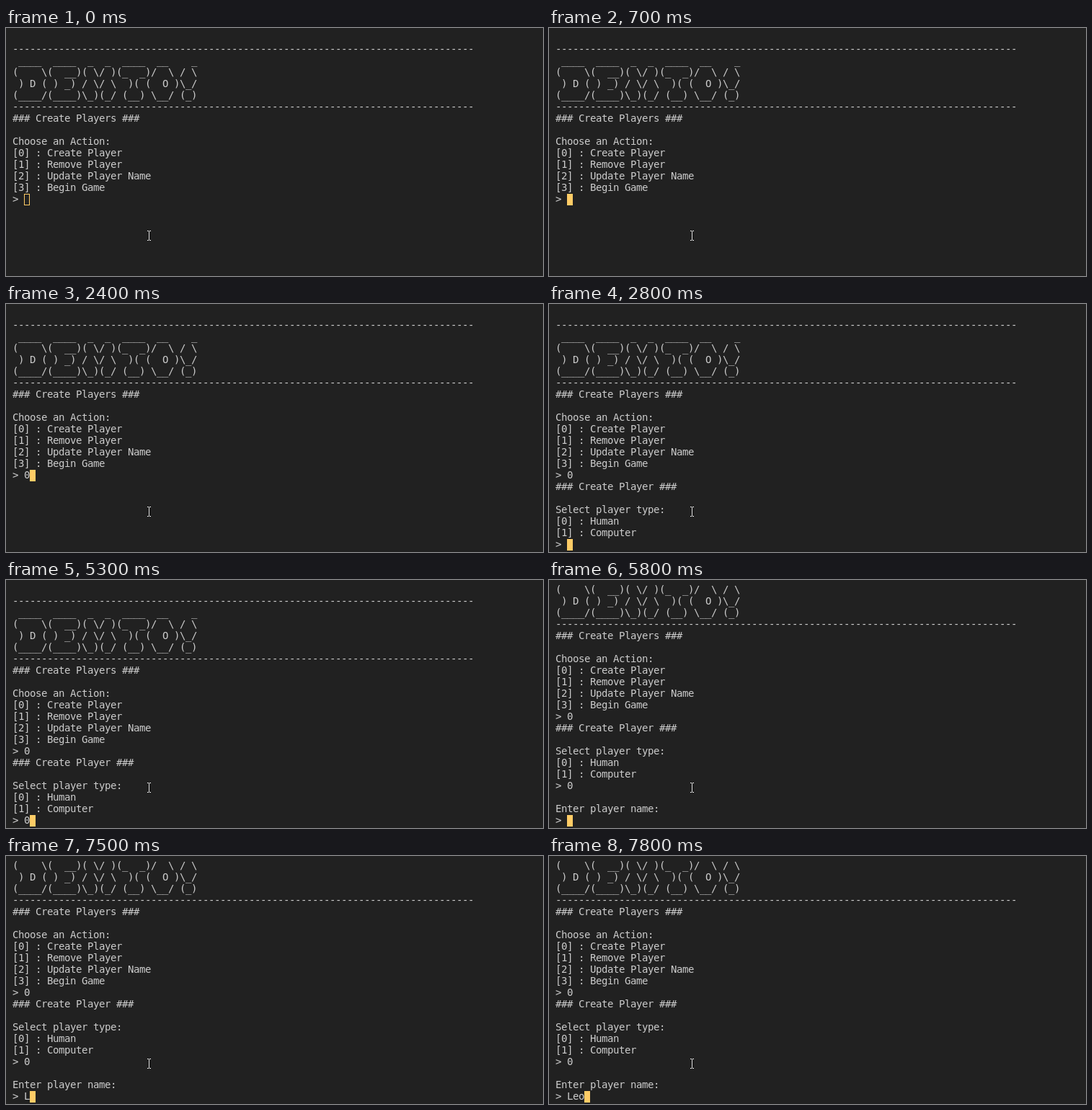
Write an HTML page that moves like this. It is 745 by 344 pixels and loops after 8000 ms.

```html
<!DOCTYPE html>
<html lang="en">
<head>
<meta charset="utf-8">
<title>Terminal game</title>
<style>
  html, body { margin: 0; width: 100%; height: 100%; overflow: hidden; background: #212121; }
  #stage { position: relative; width: 745px; height: 344px; overflow: hidden; }
  #screen {
    position: absolute; left: 9px; top: 5px; margin: 0; color: #ccc;
    font: 14px/16px "DejaVu Sans Mono", monospace;
    letter-spacing: calc(8px - 1ch); font-variant-ligatures: none;
  }
  #cursor {
    position: absolute; width: 8px; height: 16px; box-sizing: border-box;
    border: 1px solid #fc6;
  }
  #cursor.filled { background: #fc6; }
  svg { position: absolute; left: 194px; top: 280px; }
</style>
</head>
<body>
<div id="stage">
  <pre id="screen"></pre>
  <div id="cursor"></div>
  <svg width="10" height="17" fill="none">
    <path d="M4.5 2v12" stroke="#111" stroke-width="3"/>
    <path d="M2 1.5h2M5 1.5h2M4.5 2v12M2 14.5h2M5 14.5h2" stroke="#eee"/>
  </svg>
</div>
<script>
const LOOP = 8000, ROWS = 21, CELL_W = 8, CELL_H = 16, LEFT = 9, TOP = 6;
const screen = document.getElementById("screen");
const cursor = document.getElementById("cursor");
const rule = "-".repeat(80);

const banner = String.raw`
 ____  ____  _  _  ____  __    _
(    \(  __)( \/ )(_  _)/  \ / \
 ) D ( ) _) / \/ \  )( (  O )\_/
(____/(____)\_)(_/ (__) \__/ (_)`;

const menu = `
${rule}${banner}
${rule}
### Create Players ###

Choose an Action:
[0] : Create Player
[1] : Remove Player
[2] : Update Player Name
[3] : Begin Game
> `;

const typeMenu = `
### Create Player ###

Select player type:
[0] : Human
[1] : Computer
> `;

// Each entry adds output or typed characters at its time.
const events = [
  [0, menu],
  [2400, "0"],
  [2800, typeMenu],
  [5300, "0"],
  [5800, "\n\nEnter player name:\n> "],
  [7500, "L"],
  [7700, "e"],
  [7800, "o"],
];

function draw(now) {
  const t = now % LOOP;
  const output = events.filter(([at]) => at <= t).map(([, text]) => text).join("");
  const lines = output.split("\n").slice(-ROWS);
  screen.textContent = lines.join("\n");
  cursor.style.left = LEFT + CELL_W * lines.at(-1).length + "px";
  cursor.style.top = TOP + CELL_H * (lines.length - 1) + "px";
  cursor.className = t < 700 ? "" : "filled";
  requestAnimationFrame(draw);
}
requestAnimationFrame(draw);
</script>
</body>
</html>
```
